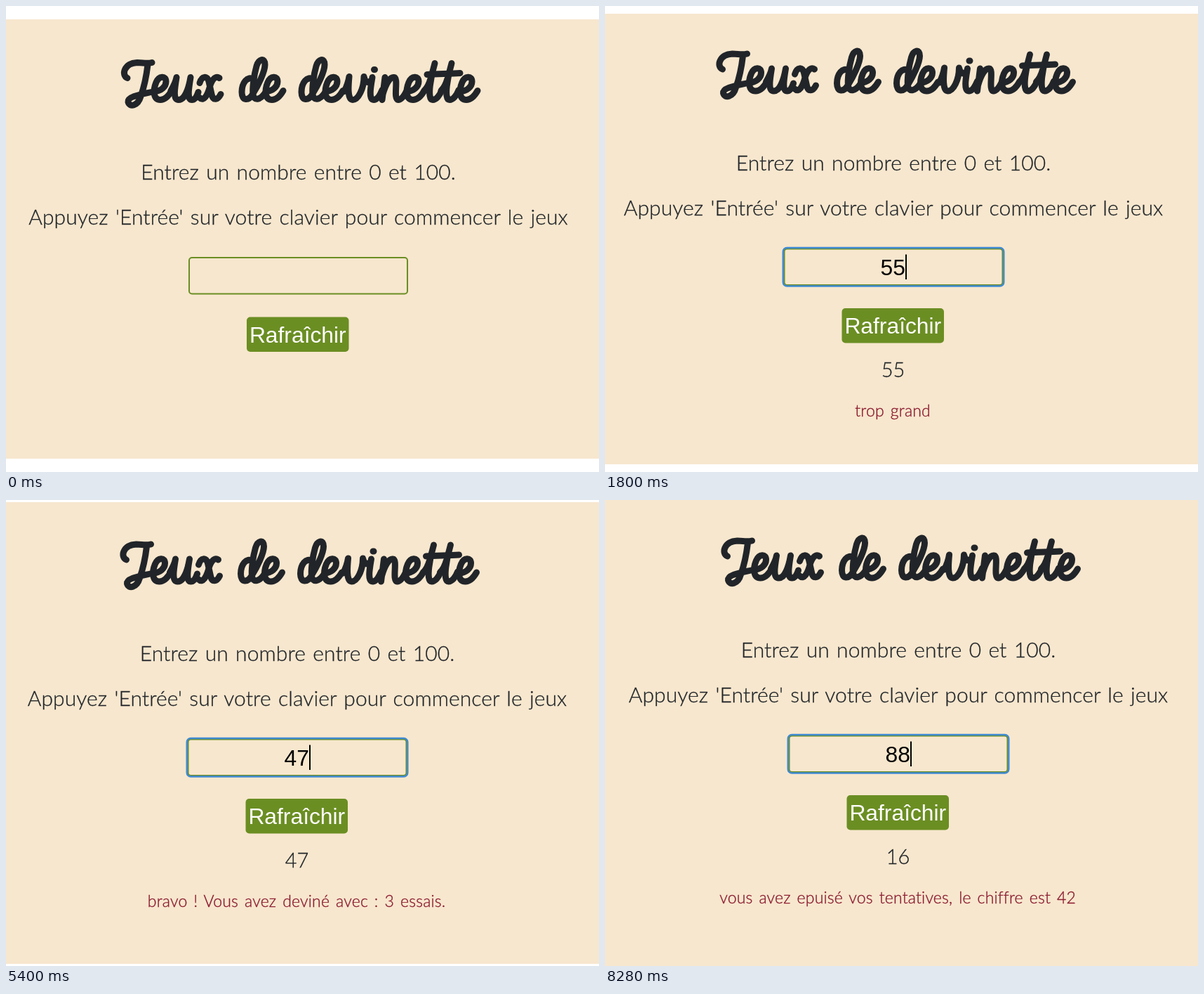
An HTML page that plays this animation: 845 px wide and 663 px high, repeating every 9000 ms.

```html
<!DOCTYPE html>
<html lang="fr">
<head>
<meta charset="utf-8">
<title>Jeux de devinette</title>
<style>
  html, body { margin: 0; width: 100%; height: 100%; overflow: hidden; background: #fff; }
  svg { display: block; width: 845px; height: 663px; }
  text { text-anchor: middle; fill: #212529; }
  .light { font: 300 30px Lato, "Open Sans", sans-serif; letter-spacing: .1px; word-spacing: 2px; stroke: #212529; stroke-width: .3; }
  .echo { font-size: 29px; letter-spacing: 0; }
  .message { font: 300 23px Lato, "Open Sans", sans-serif; letter-spacing: .2px; word-spacing: 2.5px; fill: #8b1a2f; stroke: #8b1a2f; stroke-width: .35; }
  .field { font: 31.8px "Liberation Sans", Arial, sans-serif; fill: #000; }
  .label { fill: #fff; }
  #title { fill: none; stroke: #212529; stroke-width: 9; stroke-linecap: round; stroke-linejoin: round; }
</style>
</head>
<body>
<svg viewBox="0 0 845 663">
  <rect id="band" width="845" fill="#f7e7ce"/>
  <g id="page">
    <g id="title" role="img" aria-label="Jeux de devinette"></g>
    <text class="light" x="416.5" y="246.5">Entrez un nombre entre 0 et 100.</text>
    <text class="light" x="416.5" y="310.5">Appuyez 'Entrée' sur votre clavier pour commencer le jeux</text>
    <rect x="261" y="358" width="311" height="51.5" rx="4" fill="none" stroke="#6b8e23" stroke-width="2"/>
    <g id="focus">
      <rect x="259.2" y="356.5" width="314.6" height="54.5" rx="5.5" fill="none" stroke="#3f8ad3" stroke-width="2.4"/>
      <text id="typed" class="field" x="415.8" y="395"></text>
      <rect x="433.5" y="366" width="2" height="35.5"/>
    </g>
    <rect x="343" y="442.5" width="145.5" height="49.5" rx="5" fill="#6b8e23"/>
    <text class="field label" x="415.8" y="478.5">Rafraîchir</text>
    <text id="echo" class="light echo" x="416" y="540"></text>
    <text id="message" class="message" x="415.6" y="596"></text>
  </g>
</svg>
<script>
  const STEP = 1800;
  const scenes = [
    { dx: 0, dy: 0, top: 19, bottom: 644, typed: "", echo: "", message: "" },
    { dx: -5.5, dy: -12.5, top: 11, bottom: 652, typed: "55", echo: "55", message: "trop grand" },
    { dx: -10, dy: 10, top: 32, bottom: 632, typed: "15", echo: "15", message: "trop petit" },
    { dx: -1.5, dy: -17.5, top: 3, bottom: 660, typed: "47", echo: "47",
      message: "bravo ! Vous avez deviné avec : 3 essais." },
    { dx: 1.5, dy: -22.5, top: 0, bottom: 663, typed: "88", echo: "16",
      message: "vous avez epuisé vos tentatives, le chiffre est 42" }
  ];

  // Brush lettering: each stroke is relative to the letter's left edge and baseline.
  const glyphs = {
    J: "M10-31C1-35 5-52 24-53C32-53 38-51 45-53M39-50C37-33 33-16 29-5C25 9 13 11 11 3C10-5 32-8 48-12",
    e: "M4-12C14-12 21-19 21-26C21-35 11-34 7-25C2-13 3 0 13 0C20 0 25-6 29-13",
    u: "M0-13C4-20 7-26 8-32C5-14 3 0 11 0C19 0 25-14 28-32C25-14 23 0 30 0C34 0 37-5 39-11",
    x: "M3-24C6-34 14-35 16-26L20-8C22 2 29 0 33-8M31-31C24-36 19-25 17-17C14-7 9 3 3-3",
    d: "M21-29C12-35 4-24 4-11C4 2 14 2 20-9C27-20 37-40 37-50C37-61 28-58 25-48C21-34 19-16 20-8C21 2 30 1 38-11",
    v: "M2-12C6-20 8-26 9-33C8-22 6 0 14 0C22 0 30-16 30-33C32-25 36-24 38-26",
    i: "M10-32C8-20 4 0 12 0C17 0 21-7 24-14M12.5-43L13.5-43",
    n: "M7-32L3 0M4-8C8-22 14-33 20-32C27-31 18-1 26 0C31 0 35-7 38-13",
    t: "M2-13C6-17 9-23 11-30M17-52C12-36 5 0 14 0C19 0 24-6 27-14",
    "-": "M6-36C20-37 38-37 53-38"
  };
  const lettering = [
    ["J", 163], ["e", 207], ["u", 235], ["x", 273],
    ["d", 332], ["e", 366],
    ["d", 417], ["e", 451], ["v", 480], ["i", 512], ["n", 533],
    ["e", 567], ["t", 594], ["t", 618], ["-", 594], ["e", 643]
  ];
  const get = id => document.getElementById(id);

  get("title").innerHTML = lettering
    .map(([letter, x]) => `<path transform="translate(${x} 133.5)" d="${glyphs[letter]}"/>`)
    .join("");

  function show(scene) {
    get("page").setAttribute("transform", `translate(${scene.dx} ${scene.dy})`);
    get("band").setAttribute("y", scene.top);
    get("band").setAttribute("height", scene.bottom - scene.top);
    get("focus").style.display = scene.typed ? "" : "none";
    for (const id of ["typed", "echo", "message"]) get(id).textContent = scene[id];
  }

  let current = scenes[0];
  show(current);
  const start = performance.now();
  function tick() {
    const elapsed = Math.max(0, performance.now() - start);
    const scene = scenes[Math.floor(elapsed / STEP) % scenes.length];
    if (scene !== current) show(current = scene);
    requestAnimationFrame(tick);
  }
  requestAnimationFrame(tick);
</script>
</body>
</html>
```
